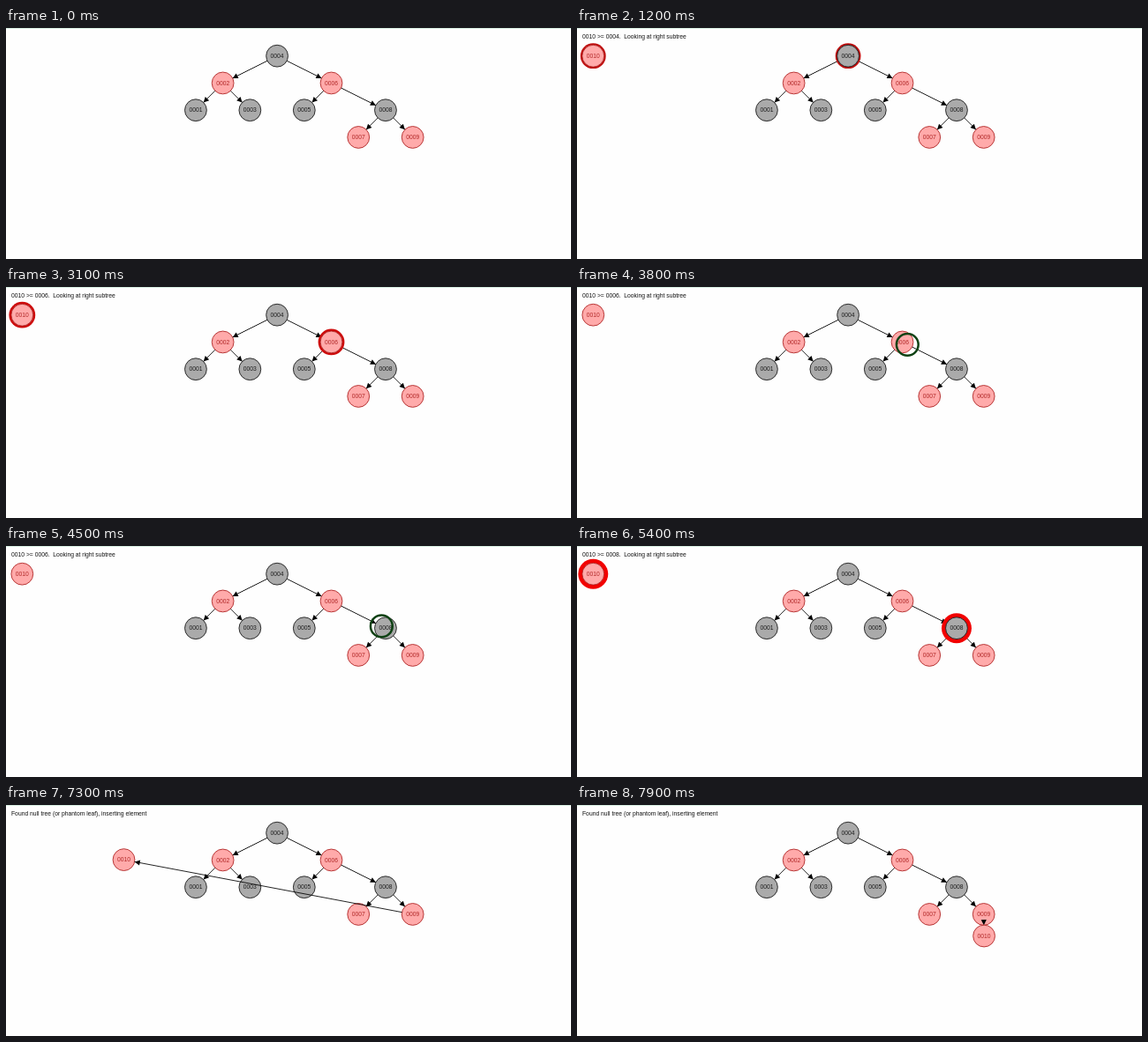
Write an HTML page with a canvas that moves like this. It is 640 px wide and 262 px high and loops after 8000 ms.

```html
<!DOCTYPE html>
<html lang="en">
<head>
<meta charset="utf-8">
<title>Red-black tree insertion</title>
<style>
html, body { margin: 0; width: 100%; height: 100%; overflow: hidden; background: #fefefe; }
canvas { display: block; }
</style>
</head>
<body>
<canvas id="stage" width="640" height="262"></canvas>
<script>
const ctx = document.getElementById('stage').getContext('2d');
const LOOP = 8000, TICK = 100;
const STEP = 842, FIRST = 1195;   // length of one step, start of the first comparison
const R = 12.4;
const RED = { fill: '#ffaaaa', line: '#b02828' };
const GRAY = { fill: '#aaaaaa', line: '#1c1c1c' };

const depths = [2, 1, 2, 0, 2, 1, 3, 2, 3];
const reds = [2, 6, 7, 9];
const nodes = {};
depths.forEach((d, i) => {
  const key = i + 1;
  nodes[key] = { key, x: 184.2 + 30.72 * key, y: 31.7 + 30.75 * d, look: reds.includes(key) ? RED : GRAY };
});
const links = [[4, 2], [4, 6], [2, 1], [2, 3], [6, 5], [6, 8], [8, 7], [8, 9]];
const path = [4, 6, 8, 9];
const start = { x: 18.3, y: 31.7 }, end = { x: 478, y: 153 };

const label = key => String(key).padStart(4, '0');
const mix = (a, b, p) => a + (b - a) * p;
const between = (a, b, p) => ({ x: mix(a.x, b.x, p), y: mix(a.y, b.y, p) });

function disc(x, y, r) {
  ctx.beginPath();
  ctx.arc(x, y, r, 0, 2 * Math.PI);
}

function drawNode({ key, x, y, look }) {
  disc(x, y, R);
  ctx.fillStyle = look.fill;
  ctx.fill();
  ctx.strokeStyle = look.line;
  ctx.lineWidth = 0.9;
  ctx.stroke();
  ctx.fillStyle = look.line;
  ctx.textAlign = 'center';
  ctx.fillText(label(key), x, y + 0.2);
}

function drawLink(a, b) {
  const angle = Math.atan2(b.y - a.y, b.x - a.x);
  const length = Math.hypot(b.x - a.x, b.y - a.y) - R;
  ctx.save();
  ctx.translate(a.x, a.y);
  ctx.rotate(angle);
  ctx.strokeStyle = ctx.fillStyle = '#000';
  ctx.lineWidth = 0.8;
  ctx.beginPath();
  ctx.moveTo(R, 0);
  ctx.lineTo(Math.max(R, length), 0);
  ctx.stroke();
  ctx.beginPath();
  ctx.moveTo(length, 0);
  ctx.lineTo(length - 6, -3.1);
  ctx.lineTo(length - 6, 3.1);
  ctx.fill();
  ctx.restore();
}

function drawHighlighted(node, t) {
  // triangle wave with a period of two steps
  const phase = (t - FIRST - 35 + 2 * STEP) % (2 * STEP) / STEP;
  const pulse = 1 - Math.abs(1 - phase);
  disc(node.x, node.y, R + mix(1.9, 4.7, pulse));
  ctx.fillStyle = `rgb(${mix(188, 242, Math.min(1, pulse * 1.5))}, ${mix(14, 0, pulse)}, ${mix(14, 0, pulse)})`;
  ctx.fill();
  drawNode(node);
}

function message(step) {
  if (step < -1) return '';
  if (step < 0) return 'Inserting 0010';
  if (step > 6) return 'Found null tree (or phantom leaf), inserting element';
  return `0010 >= ${label(path[step >> 1])}.  Looking at right subtree`;
}

function draw(t) {
  const progress = (t - FIRST) / STEP;
  const step = Math.min(7, Math.floor(progress));
  const part = Math.min(1, progress - step);
  const comparing = step >= 0 && step < 7 && step % 2 === 0;

  ctx.fillStyle = '#fefefe';
  ctx.fillRect(0, 0, 640, 262);
  ctx.fillStyle = '#d8eee2';
  ctx.fillRect(0, 0, 640, 1);

  ctx.font = '6.75px "Liberation Sans", Arial, sans-serif';
  ctx.textBaseline = 'middle';
  ctx.textAlign = 'left';
  ctx.fillStyle = '#111';
  ctx.fillText(message(step), 6, 10.3);

  const spot = step === 7 ? between(start, end, part) : start;
  const added = { key: 10, look: RED, ...spot };

  Object.values(nodes).forEach(drawNode);
  if (step >= -1) drawNode(added);
  links.forEach(([a, b]) => drawLink(nodes[a], nodes[b]));
  if (step === 7) drawLink(nodes[9], added);

  if (comparing) {
    drawHighlighted(nodes[path[step / 2]], t);
    drawHighlighted(added, t);
  } else if (step > 0 && step < 7) {
    const i = step >> 1;
    const p = between(nodes[path[i]], nodes[path[i + 1]], part);
    disc(p.x, p.y, R);
    ctx.strokeStyle = '#0f4214';
    ctx.lineWidth = 2.5;
    ctx.stroke();
  }
}

const origin = performance.now();
function frame() {
  const t = (performance.now() - origin) % LOOP;
  draw(Math.floor(t / TICK) * TICK);
  requestAnimationFrame(frame);
}
frame();
</script>
</body>
</html>
```
